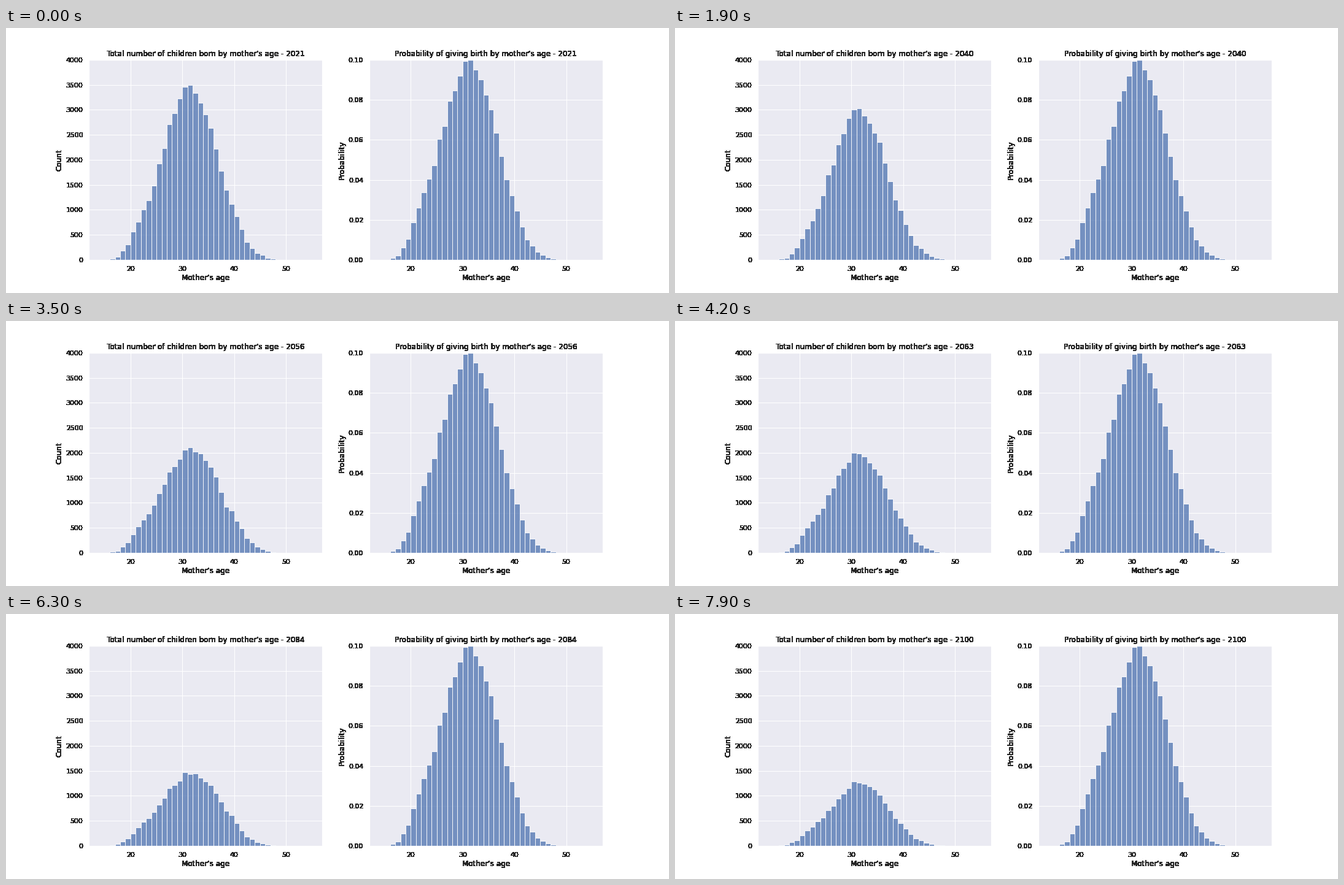
A matplotlib script for the animation above (8 s loop, 1080x432 px).

```python
import numpy as np
import matplotlib.pyplot as plt
from matplotlib.animation import FuncAnimation

plt.rcParams.update({
    "font.family": "DejaVu Sans", "text.color": ".15",
    "axes.facecolor": "#EAEAF2", "axes.edgecolor": "white",
    "axes.linewidth": 1.25, "axes.labelcolor": ".15",
    "axes.titlesize": 12, "axes.labelsize": 12,
    "axes.grid": True, "axes.axisbelow": True,
    "grid.color": "white", "grid.linewidth": 1, "grid.linestyle": "-",
    "xtick.color": ".15", "ytick.color": ".15",
    "xtick.labelsize": 11, "ytick.labelsize": 11,
    "xtick.major.size": 6, "ytick.major.size": 6,
    "xtick.bottom": False, "ytick.left": False,
})

FIRST_YEAR, YEARS = 2021, 80
AGES = np.arange(14, 55)

# Key points: (age, chance of giving birth in percent)
FERTILITY = [(15, 0), (17, .2), (19, 1.04), (20, 1.87), (22, 3.37),
             (24, 4.72), (25, 6.04), (26, 6.68), (27, 7.94), (28, 8.46),
             (30, 9.93), (31, 10), (33, 9.01), (35, 7.51), (38, 4.02),
             (41, 1.66), (42, 1.01), (44, .4), (46, .11), (48, .01)]

# Key points: (year of birth, women in thousands)
COHORTS = [(1975, 35), (1993, 35), (1998, 30.2), (2011, 30.2), (2015, 28.1),
           (2018, 24), (2023, 22), (2028, 20.3), (2037, 19.6), (2044, 18.3),
           (2053, 14.6), (2066, 13.3), (2073, 12.1), (2084, 11.5)]

prob = np.interp(AGES, *zip(*FERTILITY), right=0) / 100


def births(year):
    """Births by age: each cohort's size times its chance, with some noise."""
    women = 1000 * np.interp(year - AGES, *zip(*COHORTS))
    mean = women * prob
    noise = np.random.default_rng(year).normal(size=len(AGES))
    return np.maximum(mean + .5 * np.sqrt(mean) * noise, 0)


def harden(img, dpi):
    """Make every touched pixel opaque, for heavy unsmoothed text."""
    img[..., 3] = img[..., 3] > 0
    return np.round(img * 255).astype(np.uint8), 0, 0


def panel(ax, heights, top, step, ylabel):
    bars = ax.bar(AGES, heights, width=1, align="edge", edgecolor="white",
                  facecolor=(76 / 255, 114 / 255, 176 / 255, .75),
                  linewidth=.84)
    ax.set(xlim=(11.95, 57.05), ylim=(0, top), xticks=range(20, 51, 10),
           yticks=np.arange(0, top + step / 2, step),
           xlabel="Mother's age", ylabel=ylabel)
    for artist in (ax.xaxis, ax.yaxis, ax.title):
        artist.set_agg_filter(harden)
    return bars


fig, (left, right) = plt.subplots(1, 2, figsize=(15, 6), dpi=72,
                                  facecolor="white")
fig.subplots_adjust(left=.125, right=.9, bottom=.125, top=.88, wspace=.2)
count_bars = panel(left, births(FIRST_YEAR), 4000, 500, "Count")
panel(right, prob, .1, .02, "Probability")


def update(i):
    year = FIRST_YEAR + i
    for bar, n in zip(count_bars, births(year)):
        bar.set_height(n)
    left.set_title(f"Total number of children born by mother's age - {year}")
    right.set_title(f"Probability of giving birth by mother's age - {year}")


anim = FuncAnimation(fig, update, frames=YEARS, interval=100,
                     init_func=lambda: update(0), repeat=True, repeat_delay=0)
plt.show()
```
